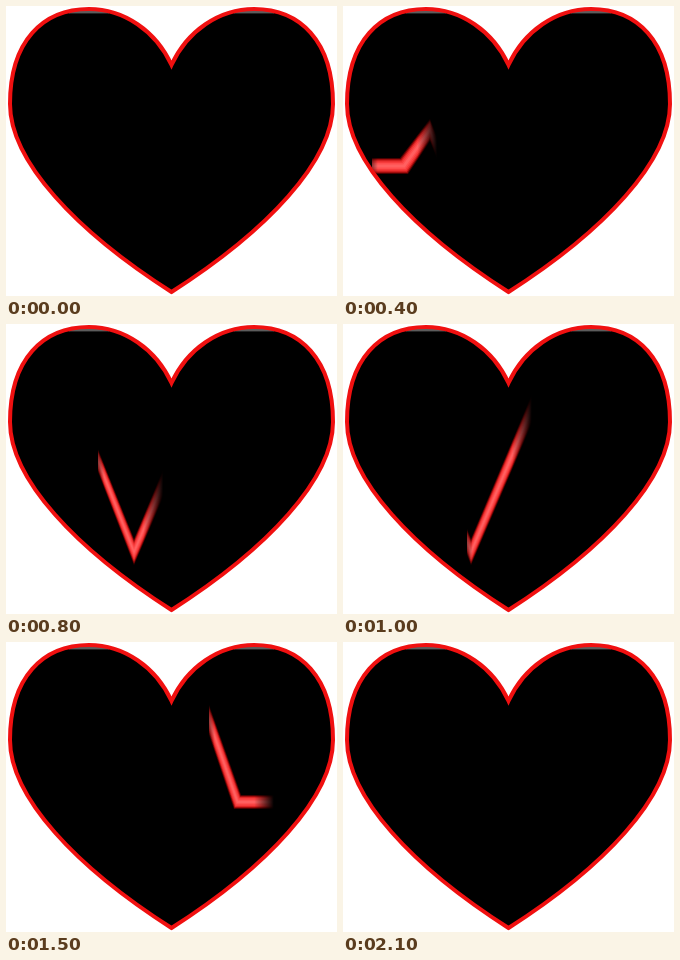
These frames come from a looping animation (331 px wide and 290 px high, 2.2 s). An HTML page with a canvas:

```html
<!DOCTYPE html>
<html lang="en">
<head>
<meta charset="utf-8">
<title>Heartbeat</title>
<style>
  html, body { margin: 0; width: 331px; height: 290px; overflow: hidden; background: #fff; }
  canvas { display: block; }
</style>
</head>
<body>
<canvas id="stage" width="331" height="290"></canvas>
<script>
const ctx = document.getElementById('stage').getContext('2d');
const STEP = 100, STEPS = 22;

const heart = new Path2D(
  'M165.5 59 C150 25 118 3 83 3 C37 3 4 35 4 98 C4 155 70 225 165.5 286 ' +
  'C261 225 327 155 327 98 C327 35 294 3 248 3 C213 3 181 25 165.5 59 Z');

// Upper and lower edge of the pulse trace
const upper = [[24, 152], [57, 152], [87, 113], [128, 215], [198, 49], [235, 153], [297, 153]];
const lower = [[24, 168], [65, 168], [87, 135], [128, 241], [198, 78], [228, 167], [297, 167]];

// Nested bands from the dark rim to the bright core: inset share, colour
const bands = [[0, '#4a0000'], [0.07, '#a00c0c'], [0.14, '#e02424'],
               [0.22, '#f63c3c'], [0.32, '#ff4e4e'], [0.41, '#ff6060']];

function mix(a, b, k) {
  return a.map((p, i) => [p[0] + (b[i][0] - p[0]) * k, p[1] + (b[i][1] - p[1]) * k]);
}

function drawTrace() {
  for (const [inset, color] of bands) {
    const edge = mix(upper, lower, inset).concat(mix(lower, upper, inset).reverse());
    ctx.beginPath();
    edge.forEach(([x, y]) => ctx.lineTo(x, y));
    ctx.closePath();
    ctx.fillStyle = color;
    ctx.fill();
  }
}

// Black veil whose opacity changes along x
function veil(from, to, stops) {
  const g = ctx.createLinearGradient(from, 0, to, 0);
  for (const [at, alpha] of stops) g.addColorStop(at, `rgba(0,0,0,${alpha})`);
  ctx.fillStyle = g;
  ctx.fillRect(0, 0, 331, 290);
}

function draw(step) {
  ctx.fillStyle = '#fff';
  ctx.fillRect(0, 0, 331, 290);
  ctx.fillStyle = '#000';
  ctx.fill(heart);

  if (step > 0 && step < STEPS - 1) {
    const left = 29 + 15.8 * (step - 4);
    ctx.save();
    ctx.clip(heart);
    drawTrace();
    veil(left, left + 65, [[0, 1], [0, 0.45], [0.09, 0], [0.7, 0], [0.85, 0.5], [1, 1]]);
    veil(282, 297, [[0, 0], [1, 1]]);
    ctx.restore();
  }

  ctx.fillStyle = '#5c5c5c';
  ctx.fillRect(63, 4, 40, 3.4);
  ctx.fillRect(228, 4, 40, 3.4);

  ctx.strokeStyle = '#f01010';
  ctx.lineWidth = 4;
  ctx.lineJoin = 'miter';
  ctx.stroke(heart);
}

function tick() {
  draw(Math.floor(performance.now() / STEP) % STEPS);
  requestAnimationFrame(tick);
}
tick();
</script>
</body>
</html>
```
